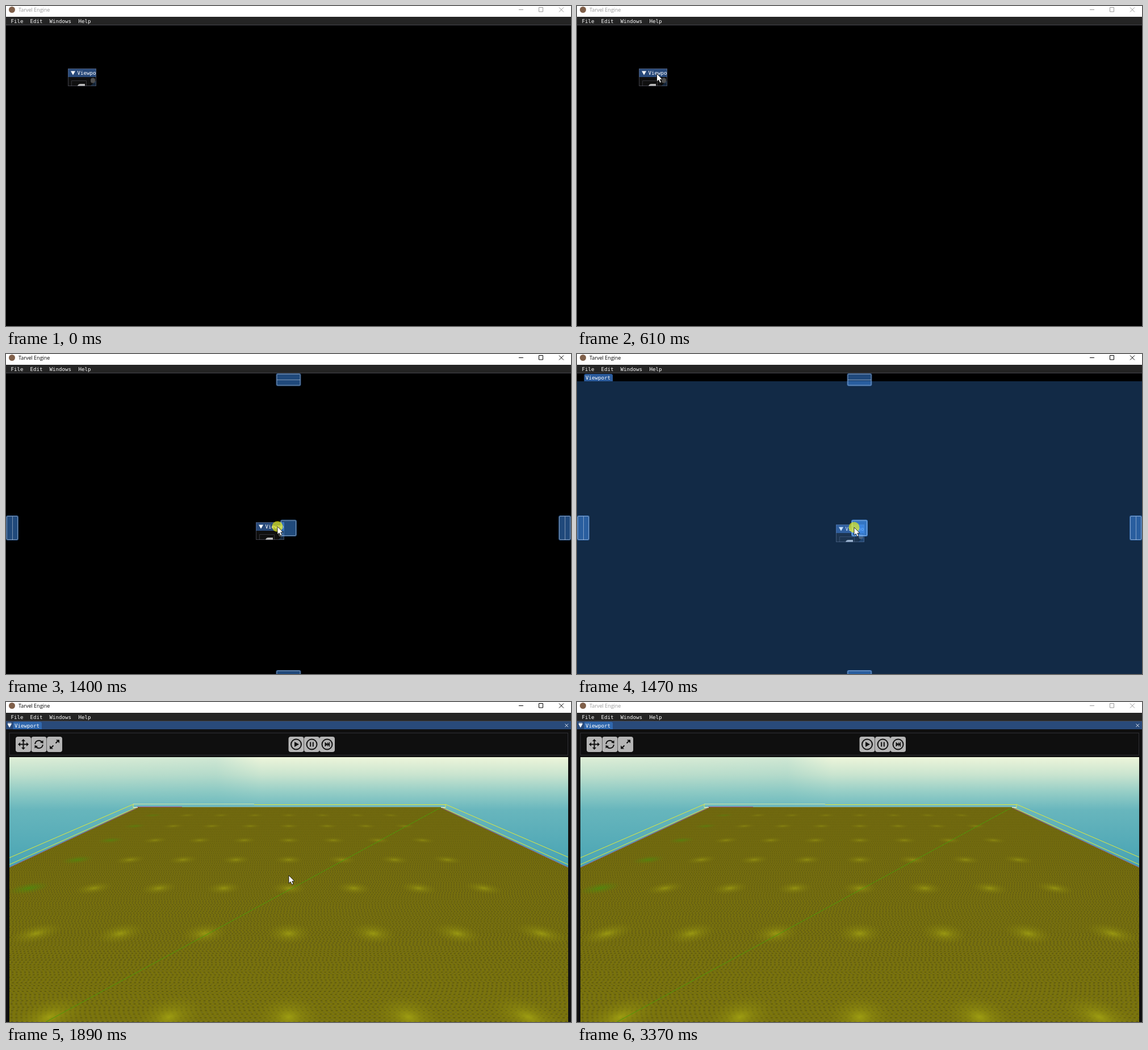
These frames come from a looping animation (995 px wide and 563 px high, 3440 ms). An HTML page:

```html
<!DOCTYPE html>
<html lang="en">
<head>
<meta charset="utf-8">
<title>Docking a viewport</title>
<style>
  html, body { margin: 0; width: 100%; height: 100%; overflow: hidden; background: #000; }
  svg { display: block; width: 995px; height: 563px; }
  text { white-space: pre; }
  .mono { font: 9.13px "DejaVu Sans Mono", monospace; fill: #fff; }
  .title { font: 9px "Open Sans", sans-serif; }
  .icon { fill: none; stroke: #111; stroke-width: 2; }
  .solid { fill: #111; stroke: none; }
  .drop { fill: rgba(66,150,250,.49); }
  .lines { fill: none; stroke: rgba(255,255,255,.42); }
</style>
</head>
<body>
<svg viewBox="0 0 995 563">
  <defs>
    <linearGradient id="sky" gradientUnits="userSpaceOnUse" x1="0" y1="97" x2="0" y2="291">
      <stop offset="0" stop-color="#edf5da"/>
      <stop offset=".16" stop-color="#c9e4cf"/>
      <stop offset=".32" stop-color="#94cdc6"/>
      <stop offset=".48" stop-color="#68b6bd"/>
      <stop offset="1" stop-color="#46a2b3"/>
    </linearGradient>
    <linearGradient id="haze" gradientUnits="userSpaceOnUse" x1="6" y1="0" x2="450" y2="0">
      <stop offset="0" stop-color="#5fb3b8" stop-opacity=".1"/>
      <stop offset=".82" stop-color="#5fb3b8" stop-opacity=".2"/>
      <stop offset="1" stop-color="#5fb3b8" stop-opacity="0"/>
    </linearGradient>
    <linearGradient id="soil" x1="0" y1="0" x2="0" y2="1">
      <stop offset="0" stop-color="#746c0d"/>
      <stop offset="1" stop-color="#7b750c"/>
    </linearGradient>
    <radialGradient id="glow">
      <stop offset="0" stop-color="#a2a212" stop-opacity=".9"/>
      <stop offset=".4" stop-color="#94920f" stop-opacity=".45"/>
      <stop offset="1" stop-color="#86820c" stop-opacity="0"/>
    </radialGradient>
    <radialGradient id="green">
      <stop offset="0" stop-color="#44920c" stop-opacity=".85"/>
      <stop offset="1" stop-color="#5a860c" stop-opacity="0"/>
    </radialGradient>
    <clipPath id="land"><path d="M232 185H766L990 291V563H6V291Z"/></clipPath>
    <clipPath id="view"><rect x="6" y="97" width="984" height="466"/></clipPath>
    <clipPath id="frame"><rect width="50" height="31"/></clipPath>
  </defs>

  <rect width="995" height="563"/>

  <g id="win">
    <g clip-path="url(#frame)">
      <rect width="50" height="31" fill="#0f0f0f"/>
      <rect width="50" height="15" fill="#294a7a"/>
      <path d="M5 4.5H13L9 11.5Z" fill="#fff"/>
      <text class="mono" x="16.5" y="11">Viewport</text>
      <path d="M6.5 31V21.5H32.5V31" fill="none" stroke="#333338"/>
      <path d="M17 31Q18 27 22 27H30V31Z" fill="#b8b8b8"/>
      <rect x="39" y="15" width="10" height="16" fill="#0a0a0a"/>
      <rect x="40" y="16.5" width="8" height="9" rx="3.5" fill="#4f4f4f"/>
      <path d="M50 21V31H39Z" fill="rgba(66,150,250,.2)"/>
    </g>
    <rect x=".5" y=".5" width="49" height="30" fill="none" stroke="rgba(110,110,128,.5)"/>
  </g>

  <g id="preview">
    <rect y="48" width="995" height="515" fill="rgba(66,150,250,.28)"/>
    <path d="M12.5 48V38Q12.5 35 15.5 35H60Q63 35 63 38V48Z" fill="#2b5b9c"/>
    <text class="mono" x="15" y="45">Viewport</text>
  </g>
  <g id="drops"></g>
  <g id="docked"></g>

  <rect width="995" height="19" fill="#fff"/>
  <circle cx="10.5" cy="6.5" r="5.5" fill="#80604a"/>
  <g id="caption">
    <text class="title" x="22" y="10">Tarvel Engine</text>
    <path d="M903 6.5H911M938.5 2.5H945.5V10H938.5ZM974 2.5L982 10.5M982 2.5L974 10.5" fill="none"/>
  </g>
  <rect y="19" width="995" height="14" fill="#242424"/>
  <rect y="33" width="995" height="1" fill="#46464c"/>
  <g class="mono">
    <text x="8.5" y="30">File</text><text x="42.5" y="30">Edit</text>
    <text x="76.5" y="30">Windows</text><text x="127.5" y="30">Help</text>
  </g>

  <g id="pointer">
    <circle id="press" r="9.5" fill="rgba(255,255,0,.6)"/>
    <path d="M0 0V14L3.2 11.2L5.5 16.3L8 15.2L5.8 10.2H10Z" fill="#fff" stroke="#000" stroke-width=".8"/>
  </g>
</svg>
<script>
const LOOP = 3440;
const $ = id => document.getElementById(id);
const range = (n, f) => Array.from({ length: n }, (_, i) => f(i)).join('');

// Dock targets
function drop(x, y, w, h, split = '') {
  return `<rect class="drop" x="${x}" y="${y}" width="${w}" height="${h}" rx="3"/>
    <rect class="lines" x="${x + 1.5}" y="${y + 1.5}" width="${w - 3}" height="${h - 3}" rx="1.5"/>
    <path class="lines" d="${split}"/>`;
}
$('drops').innerHTML =
  drop(475.5, 34, 44, 22.5, 'M477 45.5H518') +
  drop(475.5, 556, 44, 22.5) +
  drop(0, 284, 22, 44, 'M11.5 286V327') +
  drop(973, 284, 22, 44, 'M984.5 286V327') +
  `<g id="center">${drop(483, 291.5, 29, 29.5)}</g>`;

// Ground in perspective: one cell is cell(y) pixels wide
const HORIZON = 59, SLOPE = .426, MID = 498;
const cell = y => SLOPE * (y - HORIZON);

function glows() {
  return range(7, k => {
    const s = 1 / (.00474 + .002 * k), y = HORIZON + s / SLOPE;
    return range(8, n => {
      const i = n - 4, ry = s * s * .00085;
      const skew = i * SLOPE * ry;
      return `<circle r="1" fill="url(#${i < -3 ? 'green' : 'glow'})" opacity="${1 - k * .1}"
        transform="matrix(${s * .27} 0 ${skew} ${ry} ${MID + i * s} ${y})"/>`;
    });
  });
}

function grain() {
  let seed = 7, out = '';
  const rnd = () => (seed = seed * 16807 % 2147483647) / 2147483647;
  for (let y = 187, row = 0; y < 563; row++) {
    const s = cell(y), dash = Math.max(1.2, s * .018);
    const tone = row % 2 ? '#48440c' : '#66602e';
    out += `<path d="M0 ${y.toFixed(1)}H995" stroke="${tone}" stroke-width="${(.6 + s * .004).toFixed(2)}"
      stroke-dasharray="${dash.toFixed(2)} ${(dash * 1.3).toFixed(2)}" stroke-dashoffset="${(rnd() * 9).toFixed(1)}"/>`;
    y += Math.max(1.5, (y - HORIZON) ** 2 * 1.3e-5);
  }
  return `<g opacity=".6">${out}</g>`;
}

function button(x, icon) {
  return `<rect x="${x}" y="61" width="27" height="27" rx="4" fill="#b5b5b5"/>
    <g class="icon" transform="translate(${x + 13.5} 74.5)">${icon}</g>`;
}
const ring = inner => '<circle r="9"/>' + inner;
const turn = '<path d="M-6.8 -.5A6.8 6.8 0 0 1 5 -4.5"/><path class="solid" d="M2 -3.2L7.5 -1.5L7.5 -7Z"/>';
const grow = '<path d="M2 -2L6 -6"/><path class="solid" d="M2.5 -8H8.5V-2Z"/>';
const arm = '<path d="M0 0V-7"/><path class="solid" d="M-3.5 -5.5L0 -9.5L3.5 -5.5Z"/>';
const spin = (n, part) => range(n, i => `<g transform="rotate(${i * 360 / n})">${part}</g>`);

$('docked').innerHTML = `
  <rect y="34" width="995" height="529" fill="#0f0f0f"/>
  <rect y="34" width="995" height="14" fill="#294a7a"/>
  <path d="M3 38.5H9.5L6.2 44.5ZM3 37H9.5" fill="#fff" stroke="#fff" stroke-width=".8"/>
  <path d="M12.5 48V38Q12.5 35 15.5 35H60Q63 35 63 38V48Z" fill="#3067ad"/>
  <text class="mono" x="15" y="45">Viewport</text>
  <path d="M984.5 38.5L990 44M990 38.5L984.5 44" stroke="#dde4ee"/>
  <rect x="6" y="54.5" width="983.5" height="39" fill="none" stroke="#303035"/>
  ${button(17, spin(4, arm))}
  ${button(44.5, spin(2, turn))}
  ${button(72, spin(2, grow))}
  ${button(497.5, ring('<path class="solid" d="M-3 -4.5L5 0L-3 4.5Z"/>'))}
  ${button(525, ring('<path d="M-2.3 -4V4M2.3 -4V4"/>'))}
  ${button(552, ring('<path class="solid" d="M-4 -4L.5 -.8V-4L4 0L.5 4V.8L-4 4Z"/><path d="M4 -4V4" stroke-width="1.5"/>'))}
  <g clip-path="url(#view)">
    <rect x="6" y="97" width="984" height="466" fill="url(#sky)"/>
    <rect x="6" y="97" width="444" height="194" fill="url(#haze)"/>
    <g clip-path="url(#land)">
      <rect x="6" y="185" width="984" height="378" fill="url(#soil)"/>
      ${grain()}${glows()}
    </g>
    <g fill="none">
      <path d="M232 186L6 291M766 186L990 291" stroke="#8f5e9a"/>
      <path d="M231 184.5H310" stroke="#9a4a94"/>
      <path d="M310 184.5H766" stroke="#86a59c" stroke-width=".7"/>
      <path d="M6 274L224 180V186M6 286L231 185M437 180.5H774V186M774 180L990 273M767 185L990 286" stroke="#dfe83c"/>
      <path d="M224 179.5H437" stroke="#d3e8a4"/>
      <path d="M224 185.5H232M766 185.5H774" stroke="#eef4e4"/>
      <path d="M766 185.5L70 563" stroke="#4e9a08"/>
    </g>
  </g>`;

const TICKS = [0, 130, 200, 270, 340, 400, 470, 540, 610, 680, 750, 880, 940, 1010, 1080, 1140,
  1210, 1270, 1340, 1400, 1470, 1530, 1600, 1670, 1820, 1890, 1940,
  2340, 2410, 2480, 2550, 2620, 2700, 2770, 3370];

// Pointer route: time, x, y
const ROUTE = [[130, 456, 389], [270, 366, 305], [470, 190, 160], [610, 140.5, 119],
  [750, 139, 115], [880, 139, 115], [1080, 262, 190], [1340, 446, 293], [1400, 478, 303.5],
  [1470, 488, 305], [1670, 498, 305], [2270, 498, 305], [2480, 600, 405], [2700, 722, 538]];

function pointerAt(t) {
  let i = 1;
  while (i < ROUTE.length - 1 && ROUTE[i][0] < t) i++;
  const [t0, x0, y0] = ROUTE[i - 1], [t1, x1, y1] = ROUTE[i];
  const k = Math.min(1, Math.max(0, (t - t0) / (t1 - t0)));
  return [x0 + (x1 - x0) * k, y0 + (y1 - y0) * k];
}

const move = (id, x, y) => $(id).setAttribute('transform', `translate(${x} ${y})`);
const show = (id, on) => $(id).setAttribute('display', on ? 'inline' : 'none');

function draw(time) {
  const t = TICKS.findLast(tick => tick <= time);
  const within = (a, b) => t >= a && t < b;

  move('pointer', ...pointerAt(t));
  show('pointer', within(130, 2770));
  show('press', within(750, 1820));

  // The dragged window trails the pointer slightly
  const [x, y] = pointerAt(Math.max(880, t - 15));
  move('win', Math.round(x - 30), Math.round(y - 5));
  show('win', t < 1890);

  show('drops', within(940, 1890));
  show('preview', within(1470, 1890));
  show('docked', t >= 1890);
  document.querySelector('#center .drop').style.fillOpacity = t >= 1470 ? 1.43 : 1;
  document.querySelector('#center .drop').style.fill = t >= 1470 ? 'rgba(66,150,250,.7)' : '';

  const ink = within(750, 3370) ? '#000' : '#999';
  $('caption').setAttribute('fill', ink);
  $('caption').setAttribute('stroke', 'none');
  $('caption').lastElementChild.setAttribute('stroke', ink);
}

const start = performance.now();
function loop() {
  draw((performance.now() - start) % LOOP);
  requestAnimationFrame(loop);
}
loop();
</script>
</body>
</html>
```
